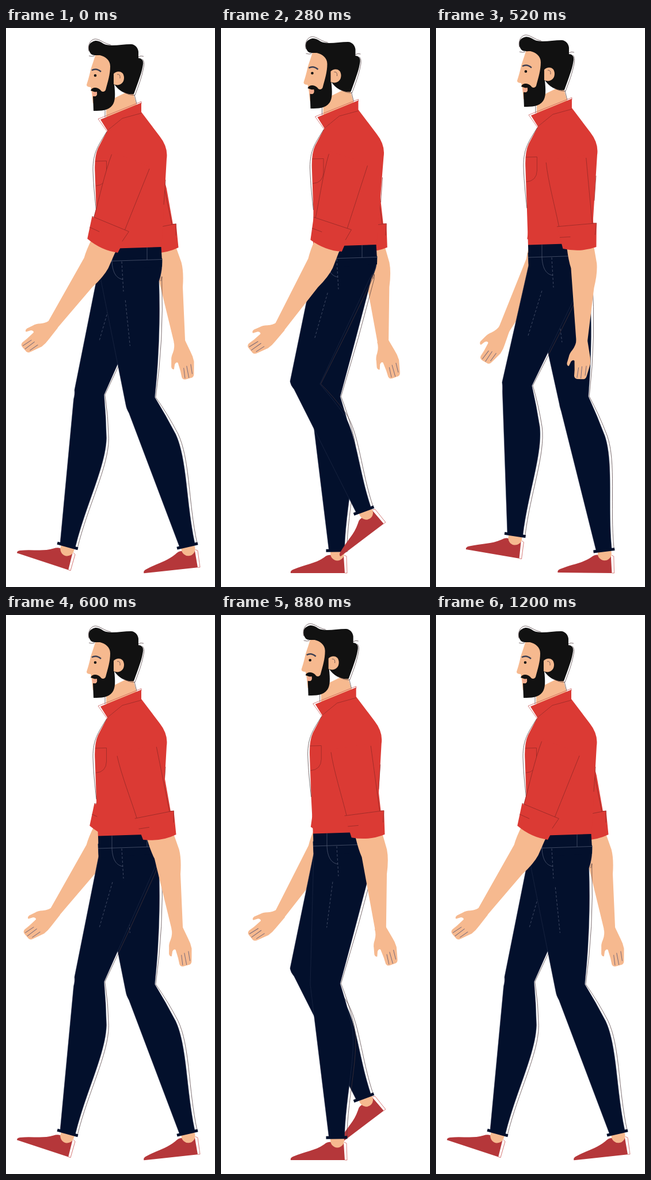
An HTML page for the animation above (1240 ms loop, 363 px wide and 965 px high).

```html
<!DOCTYPE html>
<html lang="en">
<head>
<meta charset="utf-8">
<title>Walking man</title>
<style>
html, body { margin: 0; width: 100%; height: 100%; overflow: hidden; background: #fff; }
svg { display: block; }
.skin { fill: #f6b98f; }
.red { fill: #db3a34; }
.shoe { fill: #b5373a; }
.navy { fill: #03102c; }
.hair { fill: #111; }
.line, .fold, .stitch, .finger, .heel { fill: none; stroke-width: .7; }
.line { stroke: #4a3638; }
.fold { stroke: #8f2926; }
.stitch { stroke: #59627a; }
.finger { stroke: #7a6a78; stroke-width: 1; }
.heel { stroke: #c8504c; }
.dash { stroke-dasharray: 4 3; }
.hem { stroke: #03102c; stroke-width: 5; }
.edge { stroke: #2b3550; stroke-width: .5; }
</style>
</head>
<body>
<svg id="stage" width="363" height="965" viewBox="0 0 363 965"></svg>
<script>
const LOOP = 1240, STEP = 40, CYCLE = 1200, HALF = 600;

// time, knee x y, ankle x y, knee tilt, hem tilt, foot tilt
const LEG = [
  [0, 119, 625, 107, 894, 9, 15, 18],
  [50, 115, 632, 95, 901, 8, 8, 1],
  [150, 125, 637, 145, 902, 3, 3, 0],
  [280, 155, 638, 201, 902, -2, -1, 0],
  [440, 207, 638, 260, 902, -7, -3, 0],
  [600, 208, 650, 315, 894, -14, -13, -6],
  [680, 190, 635, 318, 870, -8, -22, -28],
  [760, 155, 622, 295, 850, 0, -25, -40],
  [880, 120, 610, 248, 833, 5, -20, -37],
  [1040, 109, 602, 174, 855, 3, -6, -14]
];
// time, upper arm, forearm, hand
const ARM = [
  [0, 21.5, 32, 49], [280, 17.5, 29.5, 51], [440, 2, 9.8, 20],
  [600, -12, -11.3, -15], [880, -8.3, -8, -20], [1040, 9.6, 14.5, 9]
];
const BOB = [[0, 0], [110, 3], [280, -4], [440, -12.5]];
const SWAY = [[0, 0], [280, 3.5], [440, 2], [600, 0], [880, -.3], [1040, -.3]];

// Periodic cubic through unevenly spaced keys
function sample(keys, time, period) {
  const n = keys.length, t = time % period;
  const at = i => {
    const k = (i + n) % n;
    return { t: keys[k][0] + period * Math.floor(i / n), v: keys[k] };
  };
  let i = n - 1;
  while (keys[i][0] > t) i--;
  const [a, b, c, d] = [at(i - 1), at(i), at(i + 1), at(i + 2)];
  const tangent = (p, q, r, j) => {
    const h = q.t - p.t, k = r.t - q.t;
    return ((q.v[j] - p.v[j]) / h * k + (r.v[j] - q.v[j]) / k * h) / (h + k);
  };
  const h = c.t - b.t, s = (t - b.t) / h, s2 = s * s, s3 = s2 * s;
  return keys[0].slice(1).map((_, k) => {
    const j = k + 1;
    return b.v[j] * (2 * s3 - 3 * s2 + 1) + c.v[j] * (3 * s2 - 2 * s3) +
      h * (tangent(a, b, c, j) * (s3 - 2 * s2 + s) + tangent(b, c, d, j) * (s3 - s2));
  });
}

const path = (cls, d, id = '') => `<path class="${cls}" d="${d}"${id && ` id="${id}"`}/>`;

const armMarkup = id => `
<g id="${id}Arm">
  <g id="${id}Fore">
    ${path('skin', 'M-21,-14 L-21,0 Q-19,22 -15,35 L-9.5,164 L9.5,164 L24,70 Q31,45 30,28 L26,0 V-14 Z')}
    <g id="${id}Hand">
      ${path('skin', 'M-9.5,-4 Q-10,6 -16,14 Q-21,20 -22,26 L-25,37 Q-25,42 -21.5,42 L-18,34 Q-14,30 -12,33 L-11.5,48 L-12,59 Q-11,64 -6,64 L5,64 Q9,63 10,58 L15.5,38 Q16,28 14,20 L9.5,-4 Z')}
      ${path('finger', 'M-4.6,44 L-7,62 M1.2,42 L-.3,63 M8.8,41 L7,58')}
    </g>
  </g>
  ${path('red', 'M-42,15 C-42,50 -35,100 -31,133 L-34.5,132 L-28,171 Q2,181 30,174 L34.5,133 L29,132 L31,70 L28,15 Z')}
  ${path('fold', 'M-42,20 C-42,52 -34,100 -31,132 M28,19 L27,133 M-34.5,132 L34.5,133 L30,153 M-31.5,151 L-13,152')}
</g>`;

const legMarkup = id => `
${path('line', '', id + 'Trace')}
<g id="${id}Foot">
  ${path('shoe', 'M-80,39 Q-81,35 -76,33 C-55,24 -38,23 -22,12 Q-16,7 -10,8 L12,9 L14,39 Z')}
  ${path('heel', 'M13,8 L17,10 L18,39 H14')}
  <ellipse class="skin" cx="1" cy="5" rx="12" ry="12.5"/>
</g>
${path('navy edge', '', id + 'Leg')}
${path('hem', '', id + 'Hem')}
${path('stitch dash', '', id + 'Seam')}`;

const headMarkup =
  path('skin', 'M174,128 V162 L228,136 L219,106 Z') +
  path('line', 'M172,139 V154 M223,115 L227,131') +
  path('skin', 'M156,44 C153,55 150,62 147,72 C145,82 142,92 140,98 Q140,102 147,102 L149,112 L151,130 H185 L192,60 L180,45 Z') +
  path('hair', 'M147,44 C142,38 142,27 150,24 C157,20 163,23 169,27 C180,33 200,28 217,28 C225,28 231,36 230,44 V52 C236,52 239,56 238,63 C236,76 233,83 230,92 L222,114 C210,116 196,109 188,97 C190,115 190,126 185,133 C178,143 165,143 152,143 L151,117 C156,120 159,116 158,112 L150,109 L147,108 C149,102 158,101 164,107 C166,111 171,111 173,107 C177,92 181,80 181,66 C181,55 172,49 163,47 C157,47 150,48 147,44 Z') +
  path('skin', 'M187,79 C192,73 205,73 205,86 C205,96 196,101 187,97 Z') +
  path('line', 'M193,80 Q199,79 198,87') +
  '<path d="M150,111 L158,110 Q159,117 151,118 Z" fill="#f3a98c"/>' +
  '<path d="M149,73 Q157,68.500 165,75.500" fill="none" stroke="#3c3f52" stroke-width="2.400"/>' +
  '<circle class="hair" cx="155" cy="82" r="2.300"/>' +
  path('line', 'M144,40 C141,28 148,19 155,19 C163,19 170,27 182,29 M230,50 Q234,47 239,49 M144,48 Q150,50 154,48 M237,54 Q241,58 239,68 C236,85 230,100 224,116 Q212,116 204,110');

const collarMarkup =
  path('red', 'M164,158 L235,129 V147 L202,156 L176,177 Z') +
  path('fold', 'M235,147 L202,156 L176,177') +
  path('heel', 'M175,178 L160,157 L235,127 V131') +
  path('fold', 'M155,230 L174.500,229.500 V253 Q174,271 156,272.500 M277,262 L274,305') +
  path('line', 'M175,179 C160,203 151,215 151,245 C152,275 155,300 157,318');

const waistMarkup =
  path('navy', 'M160,381.500 L269.500,378 L271,402 V412 L161,419 Z') +
  path('stitch', 'M160,403 L271,399.500 M184,381 V403 C185,420 190,432 203,434 M245,379 V400') +
  path('stitch dash', 'M201,403 L204,455');

document.getElementById('stage').innerHTML =
  armMarkup('far') +
  `<g id="upper">${headMarkup}${path('red', '', 'torso')}${collarMarkup}</g>` +
  legMarkup('far') + legMarkup('near') +
  `<g id="waist">${waistMarkup}</g>` + armMarkup('near');

const el = {};
document.querySelectorAll('[id]').forEach(node => el[node.id] = node);
const set = (id, name, value) => el[id].setAttribute(name, value);
const pt = p => p.map(v => v.toFixed(2)).join(',');
const polar = ([x, y], deg, r) => {
  const a = deg * Math.PI / 180;
  return [x + r * Math.cos(a), y + r * Math.sin(a)];
};

function poseLeg(id, time, bob) {
  const [kx, ky, ax, ay, kneeTilt, hemTilt, footTilt] = sample(LEG, time, CYCLE);
  const knee = [kx, ky], ankle = [ax, ay];
  const pit = polar(knee, kneeTilt, 52);
  const front = polar(ankle, hemTilt, -13.5), back = polar(ankle, hemTilt, 13.5);
  const dx = back[0] - pit[0], dy = back[1] - pit[1], len = Math.hypot(dx, dy);
  // Point along the calf, pushed out behind it
  const calf = (s, out) => pt([pit[0] + dx * s + dy / len * out, pit[1] + dy * s - dx / len * out]);
  const seat = [Math.max(258, 261 + (pit[0] - 206) * .09), 437 + bob];
  const swell = Math.max(0, pit[0] - 200) * .12;
  const mid = [(seat[0] + pit[0]) / 2 + swell, (seat[1] + pit[1]) / 2];
  const shift = (p, d) => pt([p[0] + d, p[1]]);

  set(id + 'Leg', 'd', `M160,${395 + bob} L161,${416 + bob} L${pt(knee)}
    Q${pt([kx + 1, ky + 7])} ${pt([kx + (front[0] - kx) * .06, ky + (front[1] - ky) * .06])}
    L${pt(front)} L${pt(back)} C${calf(.72, 4)} ${calf(.45, 26)} ${calf(.27, 18)}
    Q${calf(.13, 10)} ${pt(pit)} Q${pt(mid)} ${pt(seat)}
    Q${pt([272, 418 + bob])} ${pt([271, 398 + bob])} Z`);
  set(id + 'Trace', 'd', `M${shift(seat, 3)} Q${pt([seat[0] + 6, seat[1] - 16])} ${shift(seat, 5)}
    Q${shift(mid, 5)} ${shift(pit, 1.5)} Q${calf(.13, 14)} ${calf(.27, 22)}
    C${calf(.45, 31)} ${calf(.72, 8)} ${calf(1, 4)}`);
  set(id + 'Hem', 'd', `M${pt(polar(ankle, hemTilt, -18.5))} L${pt(polar(ankle, hemTilt, 18.5))}`);
  set(id + 'Foot', 'transform', `translate(${pt(ankle)}) rotate(${footTilt})`);
  const lean = kx - 119;
  const top = [185 + lean * .25, 461 + lean * .1 + bob];
  set(id + 'Seam', 'd', `M${pt(top)} L${pt([top[0] - 23 + lean * .35, top[1] + 79])}`);
}

function poseArm(id, time, x, y) {
  const [upper, fore, hand] = sample(ARM, time, CYCLE);
  set(id + 'Arm', 'transform', `translate(${x},${y}) rotate(${upper})`);
  set(id + 'Fore', 'transform', `translate(0,172) rotate(${fore - upper})`);
  set(id + 'Hand', 'transform', `translate(0,163) rotate(${hand - fore})`);
}

function draw(time) {
  const [bob] = sample(BOB, time, HALF), [sway] = sample(SWAY, time, CYCLE);
  set('upper', 'transform', `translate(${sway},${bob})`);
  set('waist', 'transform', `translate(0,${bob})`);
  set('torso', 'd', `M176,177 L202,154 L235,145 L267,187 Q282,206 279,226
    L${270 - sway},382 L${160 - sway},384 L157,320 L154.500,250 Q153,222 160,207 Z`);
  poseLeg('far', time, bob);
  poseLeg('near', time + HALF, bob);
  poseArm('far', time + HALF, 234, 215 + bob);
  poseArm('near', time, 230 + sway, 215 + bob);
}

function tick(now) {
  draw(Math.floor(now % LOOP / STEP) * STEP);
  requestAnimationFrame(tick);
}
draw(0);
requestAnimationFrame(tick);
</script>
</body>
</html>
```
